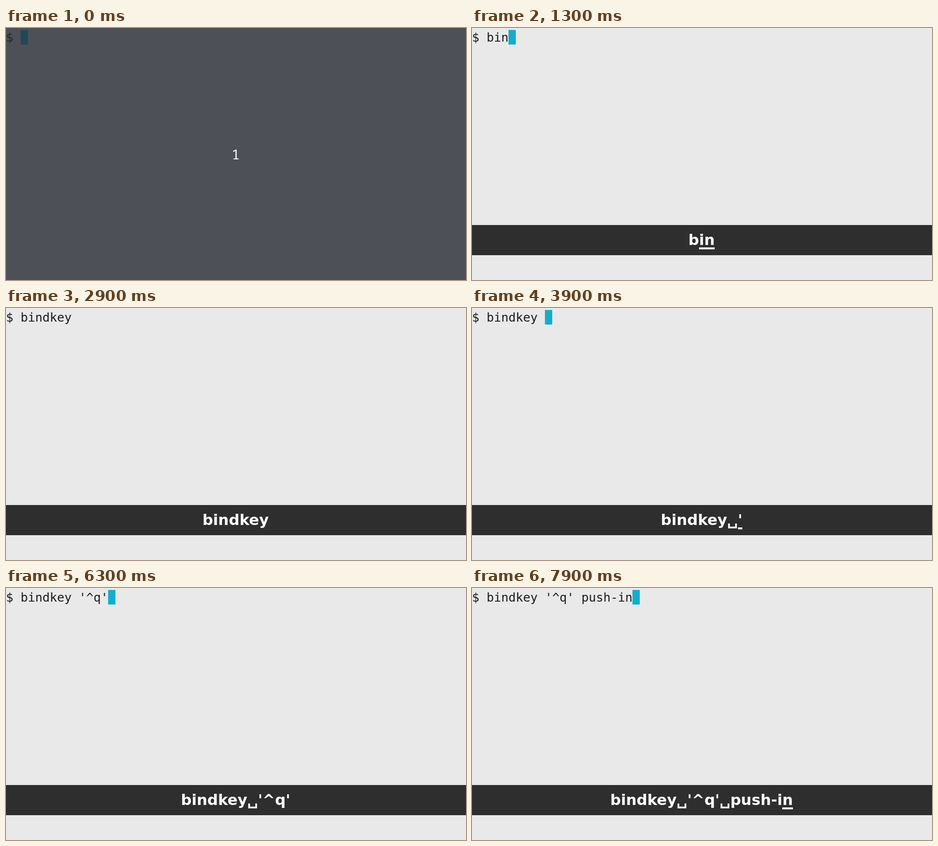
An HTML page that plays this animation: 946x518 px, repeating every 8 s.

```html
<!DOCTYPE html>
<html lang="en">
<head>
<meta charset="utf-8">
<style>
  html, body { margin: 0; width: 100%; height: 100%; overflow: hidden; background: #e9e9e9; }
  svg { display: block; width: 100vw; height: 100vh; }
  text { white-space: pre; }
  #line { font: 25px "DejaVu Sans Mono", monospace; letter-spacing: -0.05px; }
  #count { font: 28px "Noto Sans Mono", monospace; fill: #fff; text-anchor: middle; }
  #keys { font: bold 30.67px "DejaVu Sans", sans-serif; fill: #fff; }
</style>
</head>
<body>
<svg viewBox="0 0 946 518">
  <rect id="back" width="946" height="518"/>
  <rect id="cursor" y="4" width="15" height="30"/>
  <text id="line" x="0" y="28"></text>
  <text id="count" x="472.5" y="270">1</text>
  <g id="bar">
    <rect y="405" width="946" height="62" fill="#2e2e2e"/>
    <text id="keys" y="446"></text>
    <rect id="under" y="451" height="4" fill="#fff"/>
  </g>
</svg>
<script>
const LOOP = 8000, TICK = 100, INTRO = 200;
const CELL = 15, CENTER = 472.2;
const KEY_GAP = 40;     // between keys of one burst
const ECHO = 20;        // from key press to terminal output
const HOLD = 200;       // how long new keys stay underlined
const REST = 590, BLINK = 500;

// Bursts of typing: start time, characters, optional underline time
const bursts = [
  [1170, "bin", 400], [1690, "d"], [1890, "k", 300], [2230, "ey"], [3850, " '"], [5270, "^", 400],
  [5970, "q'"], [6870, " "], [7170, "pus"], [7470, "h-"], [7770, "in"],
];
const presses = bursts.flatMap(([start, text, hold = HOLD]) =>
  [...text].map((char, i) => ({ char, hold, time: start + i * KEY_GAP })));

const [back, cursor, line, count, bar, keys, under] =
  ["back", "cursor", "line", "count", "bar", "keys", "under"].map(id => document.getElementById(id));

const pressedBy = t => presses.filter(p => p.time <= t);
const textOf = list => list.map(p => p.char).join("");
const show = (node, on) => node.setAttribute("visibility", on ? "inherit" : "hidden");

function drawTerminal(t) {
  const intro = t < INTRO;
  const done = pressedBy(t - ECHO);
  const last = done.length ? done.at(-1).time + ECHO : INTRO - REST;
  const idle = t - last - REST;
  back.setAttribute("fill", intro ? "#4d5057" : "#e9e9e9");
  line.setAttribute("fill", intro ? "#262a2e" : "#1c1c1c");
  line.textContent = "$ " + textOf(done);
  cursor.setAttribute("fill", intro ? "#224854" : "#14aeca");
  cursor.setAttribute("x", (done.length + 2) * CELL);
  show(cursor, idle < 0 || Math.floor(idle / BLINK) % 2);
  show(count, intro);
}

// Keys of the latest tick count as new; spaces are never underlined
function newKeys(done, t) {
  const { time, hold } = done.at(-1);
  const tick = Math.ceil(time / TICK) * TICK;
  if (t - tick >= hold) return 0;
  return textOf(done.filter(p => p.time > tick - TICK)).trim().length;
}

function drawKeys(t) {
  const done = pressedBy(t);
  show(bar, done.length);
  if (!done.length) return;
  keys.textContent = textOf(done).replaceAll(" ", "␣");
  const width = keys.getComputedTextLength();
  const right = CENTER + width / 2;
  keys.setAttribute("x", right - width);

  const fresh = newKeys(done, t);
  show(under, fresh);
  if (!fresh) return;
  const tail = keys.getSubStringLength(done.length - fresh, fresh);
  const from = Math.round(right - tail);
  under.setAttribute("x", from);
  under.setAttribute("width", Math.round(right) - from);
}

const start = performance.now();
function frame() {
  const t = (performance.now() - start) % LOOP;
  const tick = Math.floor(t / TICK) * TICK;
  drawTerminal(tick);
  drawKeys(tick);
  requestAnimationFrame(frame);
}
frame();
</script>
</body>
</html>
```
